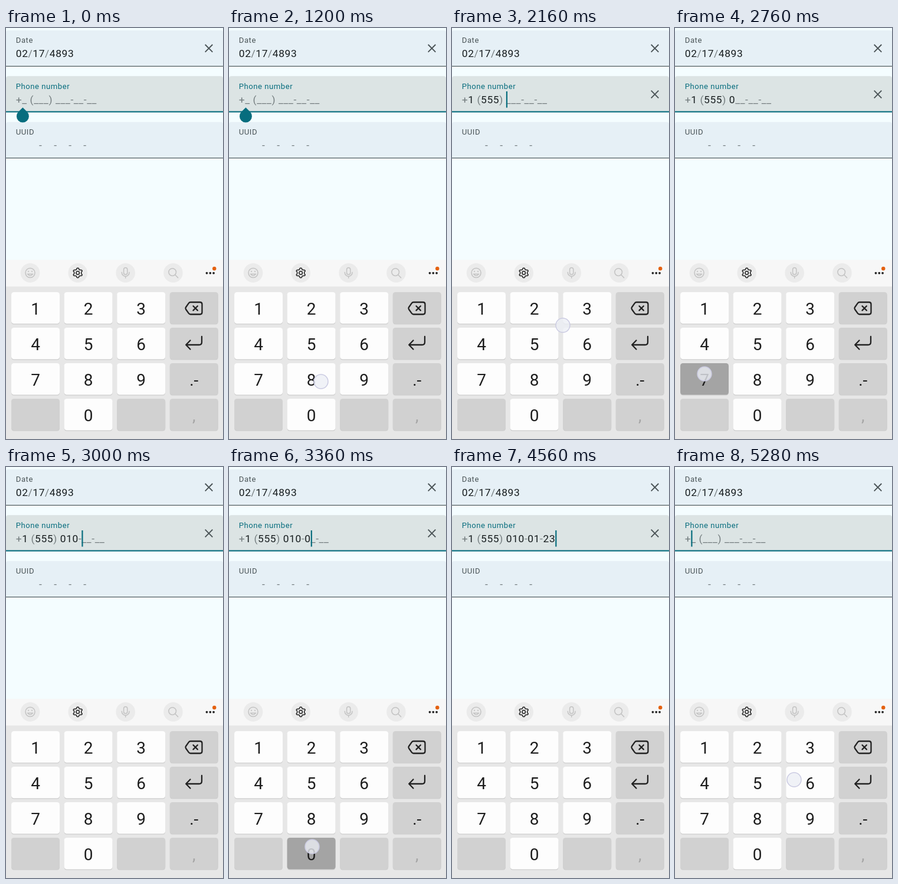
An HTML page that plays this animation: 368 px wide and 694 px high, repeating every 5.4 s.

```html
<!DOCTYPE html>
<html lang="en">
<head>
<meta charset="utf-8">
<title>Masked input</title>
<style>
  html, body { margin: 0; width: 100%; height: 100%; overflow: hidden; background: #f4fdff; }
  svg { display: block; width: 368px; height: 694px; font-family: Roboto, sans-serif; }
  text { white-space: pre; }
  .label { font-size: 13.1px; letter-spacing: .53px; fill: #4b5558; }
  .value { font-size: 17.4px; letter-spacing: .6px; fill: #737c7e; }
  .typed { fill: #161c1e; }
  .teal { fill: #076d7e; }
  .key { fill: #fdfdfd; }
  .key.grey { fill: #d1d1d1; }
  .key.down { fill: #a4a4a4; }
  .shadow { fill: #cdcdcd; }
  .digit { font-size: 28px; text-anchor: middle; fill: #1d1d1d; }
  .line { fill: none; stroke: #222; stroke-width: 2.3; stroke-linecap: round; stroke-linejoin: round; }
  .cross { fill: none; stroke: #4a5356; stroke-width: 1.9; }
  .tool { fill: none; stroke: #c3c3c3; stroke-width: 1.5; stroke-linecap: round; }
  .tool.active { stroke: #222; stroke-linejoin: round; }
</style>
</head>
<body>
<svg id="stage" viewBox="0 0 368 694"></svg>
<script>
const LOOP = 5400;
const MASK = '+_ (___) ___-__-__';
const DIGITS = '15550100123';
const TYPED_AT = [1320, 1680, 1920, 2040, 2280, 2880, 3000, 3240, 3480, 3600, 4320];
const CLEARED_AT = 5040;
const CARET_OFF = [[0, 240], [720, 1320], [2760, 2880], [3960, 4200], [4800, 5040]];
// x, y, start, end, highlighted key
const TOUCHES = [
  [156, 597, 1200, 1440],
  [146, 535, 1560, 1680, '5'],
  [47, 530, 1800, 1920, '4'],
  [125, 480, 1920, 2040, '2'],
  [188, 502, 2160, 2400],
  [50, 584, 2760, 2880, '7'],
  [70, 525, 2880, 3000, '4'],
  [66, 525, 3120, 3240, '4'],
  [141, 641, 3360, 3480, '0'],
  [140, 574, 3480, 3600, '8'],
  [141, 499, 4200, 4440],
  [345, 108, 4800, 5040],
  [202, 528, 5160, 5400]
];

const cross = (y, id = '') =>
  `<path ${id} class="cross" d="M337.7 ${y - 6.3}l12.6 12.6m0 -12.6l-12.6 12.6"/>`;

const field = (y, fill) =>
  `<path d="M0 ${y + 61}V${y + 4}q0 -4 4 -4H364q4 0 4 4V${y + 61}z" fill="${fill}"/>`;

const underline = y => `<rect y="${y}" width="368" height="1.1" fill="#434d50"/>`;

const label = (y, text, extra = '') => `<text class="label ${extra}" x="16.8" y="${y}">${text}</text>`;

function maskedText(text) {
  return [...text].map(c => /\d/.test(c) ? `<tspan class="typed">${c}</tspan>` : c).join('');
}

function keyboard() {
  const rows = ['123<', '456>', '789.', ' 0 ,'];
  return rows.map((row, r) => [...row].map((name, c) => {
    const x = 9 + c * 89.6, y = 446 + r * 60;
    const isDigit = /\d/.test(name);
    const size = `x="${x}" width="82" height="53.3" rx="4.5"`;
    const text = isDigit ? name : { '.': '.-', ',': ',' }[name] || '';
    const faded = name === ',' ? 'style="fill:#a5a5a5"' : '';
    return `<rect class="shadow" ${size} y="${y + 1.2}"/>
      <rect class="key ${isDigit ? '' : 'grey'}" data-key="${name}" ${size} y="${y}"/>
      <text class="digit" ${faded} x="${x + 41}" y="${y + 38}">${text}</text>`;
  }).join('')).join('');
}

function gear(cx, cy) {
  const points = [];
  for (let i = 0; i < 32; i++) {
    const radius = 7.1 + 1.1 * Math.tanh(3 * Math.cos(i * Math.PI * 3 / 8));
    const angle = i * Math.PI / 16 - Math.PI / 2;
    points.push([cx + radius * Math.cos(angle), cy + radius * Math.sin(angle)].map(v => v.toFixed(2)));
  }
  return `<polygon class="tool active" points="${points.join(' ')}"/>
    <circle class="tool active" cx="${cx}" cy="${cy}" r="2.8"/>`;
}

const toolbar = () => `
  <rect y="391.5" width="368" height="45" fill="#f7f7f7"/>
  ${[41, 121.7, 202.7, 283.5].map(x => `<circle cx="${x}" cy="413.5" r="16.3" fill="#ebebeb"/>`).join('')}
  <circle class="tool" cx="41" cy="413.5" r="8"/>
  <path class="tool" d="M36.8 415.5q4.2 5.6 8.4 0z"/>
  <path class="tool" style="stroke-width:2.2" d="M38 411v.1M44 411v.1"/>
  ${gear(121.7, 413.5)}
  <rect class="tool" x="199.6" y="404.8" width="6.2" height="11.5" rx="3.1"/>
  <path class="tool" d="M196.3 412.5c0 9 12.8 9 12.8 0M202.7 419.2v3"/>
  <circle class="tool" cx="282.2" cy="412.2" r="6.3"/>
  <path class="tool" d="M287 417l4.6 4.6"/>
  ${[340.5, 346.3, 352.1].map(x => `<circle cx="${x}" cy="413.8" r="1.9" fill="#222"/>`).join('')}
  <circle cx="353.3" cy="406.3" r="3.2" fill="#e4600f"/>`;

const $ = id => document.getElementById(id);

$('stage').innerHTML = `
  <rect width="368" height="694" fill="#f4fdff"/>
  ${field(4, '#e6f0f6')}${underline(64)}
  ${label(25, 'Date')}
  <text class="value" x="16.8" y="49">${maskedText('02/17/4893')}</text>
  ${cross(34.3)}
  ${field(81.3, '#dce4e4')}
  <rect class="teal" y="140.4" width="368" height="2.1"/>
  ${label(102.8, 'Phone number', 'teal')}
  <text id="phone" class="value" x="16.8" y="126.7"></text>
  ${cross(112, 'id="clear"')}
  ${field(158.8, '#e6f0f6')}${underline(219)}
  ${label(180.2, 'UUID')}
  <text class="value" x="16.8" y="204.3">${' '.repeat(8)}${Array(4).fill('-').join(' '.repeat(4))}</text>
  <rect id="caret" class="teal" y="107" width="2.2" height="27.5"/>
  <path id="handle" class="teal" d="M28.4 134.2l7.4 7.4a10.5 10.5 0 1 1 -14.8 0z"/>
  <rect y="436" width="368" height="258" fill="#e7e7e7"/>
  ${toolbar()}
  ${keyboard()}
  <path class="line" d="M313 463H329q3.5 0 3.5 3.5V480q0 3.5 -3.5 3.5H313q-2 0 -3.3 -1.8L305 475q-1.2 -1.8 0 -3.5L309.7 464.8Q311 463 313 463z"/>
  <path class="line" d="M317.5 469.5l7.4 7.4m0 -7.4l-7.4 7.4"/>
  <path class="line" d="M332 521V530.5q0 4.5 -4.5 4.5H305.5M312.5 527.5l-7.3 7.5l7.3 7.5"/>
  <circle id="touch" r="12" fill="#eceef5" fill-opacity=".78" stroke="#cbcbe2" stroke-width="1.5"/>`;

const show = (id, visible) => $(id).setAttribute('visibility', visible ? 'visible' : 'hidden');
const within = (t, start, end) => t >= start && t < end;
const keys = [...document.querySelectorAll('.key')];
let shownCount = -1;

function setPhone(count) {
  if (count === shownCount) return;
  shownCount = count;
  let used = 0;
  const text = MASK.replace(/_/g, blank => used < count ? DIGITS[used++] : blank);
  $('phone').innerHTML = maskedText(text);
  const blank = text.indexOf('_');
  const position = blank < 0 ? text.length : blank;
  $('caret').setAttribute('x', 16.8 + $('phone').getSubStringLength(0, position));
  show('clear', count > 0);
}

function draw(now) {
  const t = now % LOOP;
  setPhone(t < CLEARED_AT ? TYPED_AT.filter(at => t >= at).length : 0);
  show('caret', !CARET_OFF.some(([start, end]) => within(t, start, end)));
  show('handle', t < TYPED_AT[0]);

  const touch = TOUCHES.find(([, , start, end]) => within(t, start, end));
  show('touch', touch);
  if (touch) {
    $('touch').setAttribute('cx', touch[0]);
    $('touch').setAttribute('cy', touch[1]);
  }
  const pressed = touch && touch[4];
  keys.forEach(key => key.classList.toggle('down', key.dataset.key === pressed));
}

function tick() {
  draw(performance.now());
  requestAnimationFrame(tick);
}
tick();
</script>
</body>
</html>
```
